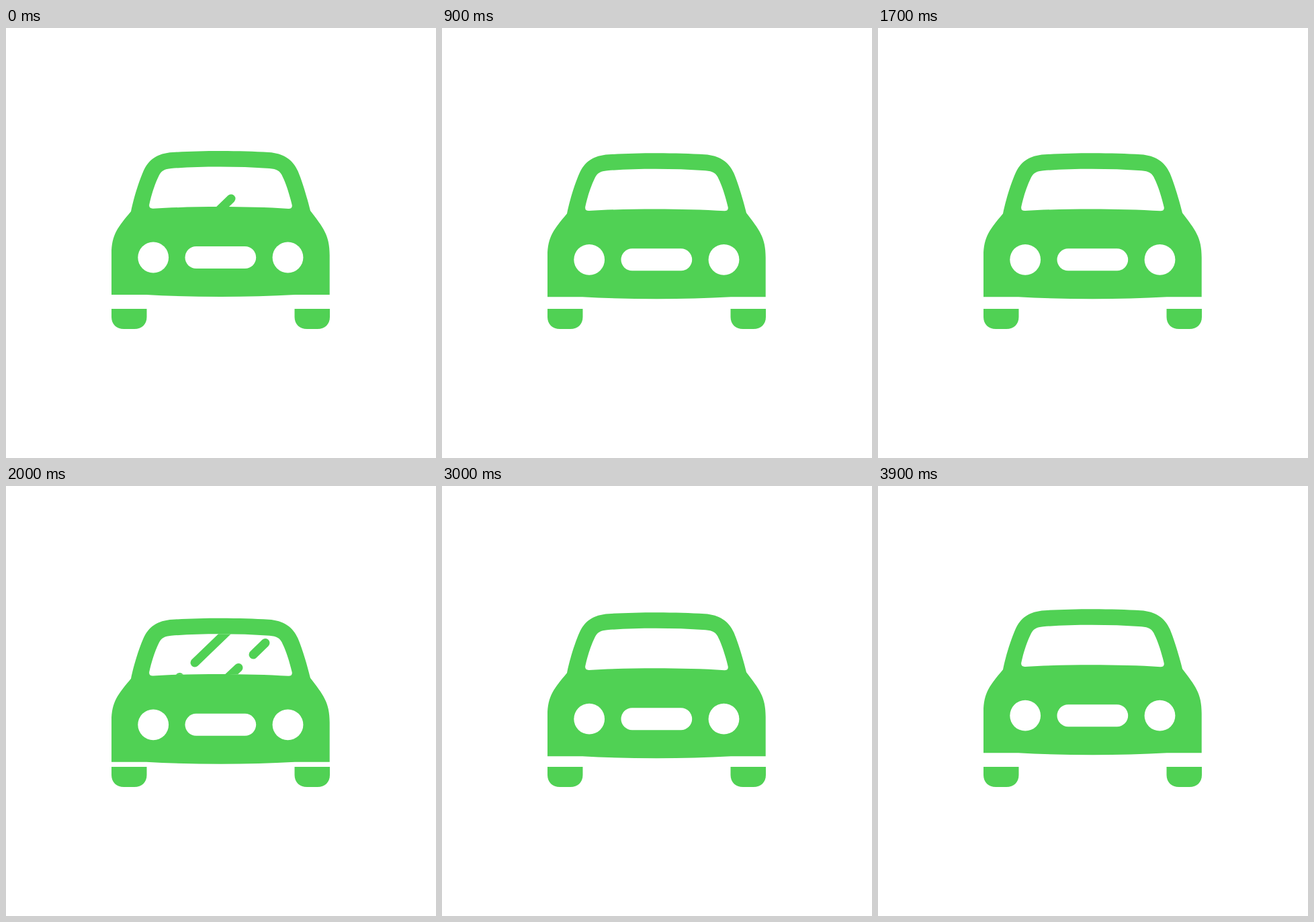
Animation, 640 px wide and 640 px high, one loop 4 s. Source, as an HTML page:

```html
<!DOCTYPE html>
<html lang="en">
<head>
<meta charset="utf-8">
<title>Driving car</title>
<style>
  html, body { margin: 0; width: 100%; height: 100%; overflow: hidden; background: #fff; }
  svg { display: block; width: 100vw; height: 100vh; }
</style>
</head>
<body>
<svg viewBox="0 0 640 640" fill="#50d154">
  <defs>
    <path id="glass" d="M219 268.7C280 265.2 360 265.2 420.5 269Q426.5 269 425.7 263.5C422 248 417 232 412 222C408 212 403 210 392 209C345 205.7 290 205.7 246 209C236 210 231.500 212 227.500 220C221 233 216 250 213.200 263Q212.500 269 219 268.700Z"/>
    <clipPath id="pane"><use href="#glass"/></clipPath>
    <path id="wheel" d="M157 418H209.500V430C209.500 441 202 448 191 448H175.500C164.500 448 157 441 157 430Z"/>
  </defs>

  <use href="#wheel"/>
  <use href="#wheel" transform="translate(639 0) scale(-1 1)"/>

  <g id="car">
    <path d="M157 397V336C157 307 167 296 186 273C189 257 197 230 204.500 213C212 196 225 186.500 248 185C290 182.300 350 182.300 391 185C413 186.500 427 196 434.500 213C442 231 449 256 453 272C472 297 481.700 308 481.700 338V397H430C360 401 280 401 209 397Z"/>
    <g fill="#fff">
      <use href="#glass"/>
      <circle cx="219.200" cy="341.500" r="22.900"/>
      <circle cx="419.500" cy="341.500" r="22.900"/>
      <rect x="266.500" y="325" width="105.700" height="33" rx="16.500"/>
    </g>
    <g clip-path="url(#pane)">
      <path id="streaks" fill="none" stroke="#50d154" stroke-width="13" stroke-linecap="round"
        d="M281 263L335 211M368 251L386 233.500M346 270.500L292 321M258.500 284.500L206 335"/>
    </g>
  </g>
</svg>

<script>
  const LOOP = 4000, STEP = 100;
  const bounce = [0, 3.3, 8.8, 12.9, 13.8, 10.4, 5.2, 0.2];
  // Each sweep carries the streaks up across the windscreen.
  const sweeps = [
    { at: 0, y: 43, speed: 0.21 },
    { at: 1800, y: 44, speed: 0.22 }
  ];
  const car = document.getElementById('car');
  const streaks = document.getElementById('streaks');
  const shift = (el, y) => el.setAttribute('transform', `translate(0 ${y.toFixed(2)})`);

  function draw(now) {
    const t = Math.floor((now % LOOP) / STEP) * STEP;
    const drop = bounce[(t / STEP) % bounce.length];
    const sweep = sweeps[t < sweeps[1].at ? 0 : 1];
    shift(car, drop);
    shift(streaks, sweep.y - sweep.speed * (t - sweep.at) - drop);
  }

  const start = performance.now();
  function tick() {
    draw(performance.now() - start);
    requestAnimationFrame(tick);
  }
  tick();
</script>
</body>
</html>
```
